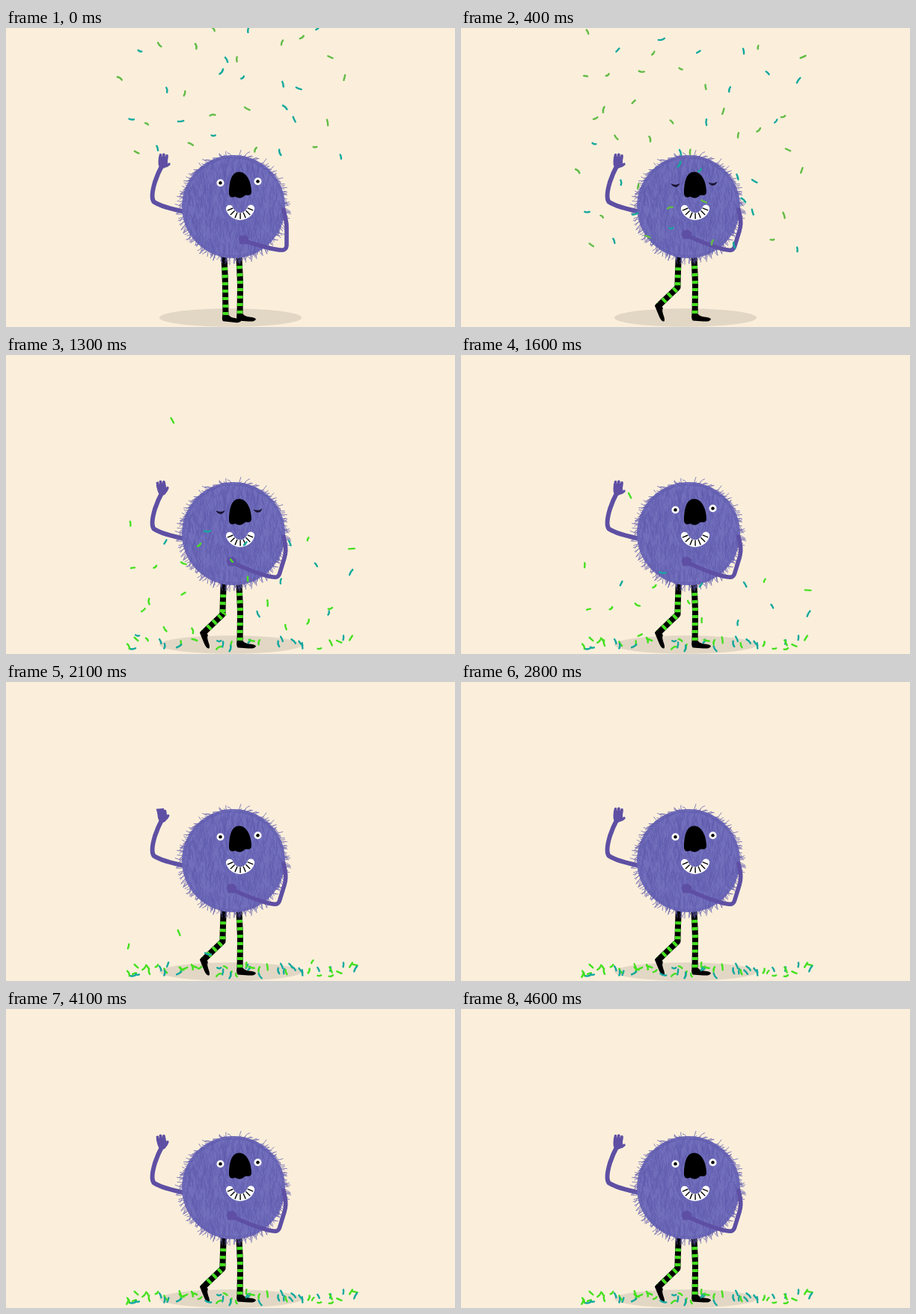
An HTML page with a canvas that plays this animation: 600x400 px, repeating every 4700 ms.

```html
<!DOCTYPE html>
<html lang="en">
<head>
<meta charset="utf-8">
<title>Furry friend with confetti</title>
<style>
  html, body { margin: 0; width: 100%; height: 100%; overflow: hidden; background: #fbefdb; }
  canvas { display: block; }
</style>
</head>
<body>
<canvas id="stage" width="600" height="400"></canvas>
<script>
const STEP = 100, STEPS = 47;
const PAPER = '#fbefdb', SHADE = '#e2d7c5', SKIN = '#5e4fa4', FUR = '#716ebc', HAIR = '#605bad';
const LIME = '#45e01f', LEAF = '#62bb46', TEAL = '#14a89d';

const ctx = document.getElementById('stage').getContext('2d');

function seeded(seed) {
  return () => (seed = (seed * 16807) % 2147483647) / 2147483647;
}
const mix = (a, b, p) => a + (b - a) * p;
const between = (a, b, p) => ({ x: mix(a.x, b.x, p), y: mix(a.y, b.y, p) });

function line(c, path, color, width, cap = 'round') {
  c.strokeStyle = color;
  c.lineWidth = width;
  c.lineCap = cap;
  c.lineJoin = 'round';
  c.stroke(typeof path === 'string' ? new Path2D(path) : path);
}
function fill(c, d, color) {
  c.fillStyle = color;
  c.fill(new Path2D(d));
}
function oval(c, x, y, rx, ry, color) {
  c.fillStyle = color;
  c.beginPath();
  c.ellipse(x, y, rx, ry, 0, 0, 7);
  c.fill();
}
function placed(x, y, angle, paint) {
  ctx.save();
  ctx.translate(x, y);
  ctx.rotate(angle);
  paint();
  ctx.restore();
}

// ---- Furry ball, painted once ----
function paintFur() {
  const layer = document.createElement('canvas');
  layer.width = 600;
  layer.height = 400;
  const c = layer.getContext('2d');
  const rnd = seeded(4711);
  const cx = 304, cy = 239, r = 69;
  const strand = (x, y, a, len, bend, width) => {
    const ex = x + Math.cos(a) * len, ey = y + Math.sin(a) * len;
    const mx = (x + ex) / 2 - Math.sin(a) * bend, my = (y + ey) / 2 + Math.cos(a) * bend;
    line(c, `M${x} ${y}Q${mx} ${my} ${ex} ${ey}`, HAIR, width);
  };
  oval(c, cx, cy, r, r, FUR);
  for (let i = 0; i < 800; i++) {
    const a = rnd() * 6.283, d = Math.sqrt(rnd()) * (r - 4);
    strand(cx + Math.cos(a) * d, cy + Math.sin(a) * d - 4,
      1.57 + (rnd() - 0.5) * 0.8, 7 + rnd() * 7, (rnd() - 0.5) * 5, 0.65);
  }
  for (let i = 0; i < 230; i++) {
    const a = i / 230 * 6.283;
    const side = Math.cos(a) < 0 ? -1 : 1;
    const lean = side * (0.35 + 0.6 * Math.max(0, -Math.sin(a))) + (rnd() - 0.5) * 1.3;
    const d = r - 4;
    strand(cx + Math.cos(a) * d, cy + Math.sin(a) * d, a + lean,
      7 + rnd() * 6, (rnd() - 0.5) * 8, 0.75);
  }
  return layer;
}
const fur = paintFur();

// ---- Legs ----
function leg(hip, knee, heel, bare) {
  const d = `M${hip.x} ${hip.y}Q${knee.x} ${knee.y - 12} ${knee.x} ${knee.y}L${heel.x} ${heel.y}`;
  line(ctx, d, '#000', 8, 'butt');
  const dash = [0, bare];
  for (let i = 0; i < 10; i++) dash.push(4, 6);
  ctx.setLineDash(dash);
  line(ctx, d, LIME, 7.6, 'butt');
  ctx.setLineDash([]);
}
function foot(x, y, angle) {
  placed(x, y, angle, () =>
    fill(ctx, 'M-4.5-5L4.5-5Q6-2.5 12-2Q21-1.500 21 1.2Q19 4.5 11 4L-3 3.6Q-5.5 2-4.5-5Z', '#000'));
}
function legs(p) {
  const knee = between({ x: 293, y: 346 }, { x: 289.5, y: 347 }, p);
  const heel = between({ x: 293.5, y: 388 }, { x: 263.5, y: 372 }, p);
  leg({ x: 291, y: 300 }, knee, heel, 20);
  foot(heel.x, heel.y + 1, mix(0.08, 1.15, p));
  leg({ x: 311, y: 300 }, { x: 313, y: 346 }, { x: 312.5, y: 388 }, 18);
  foot(313, 388, 0.04);
}

// ---- Arms ----
function wavingArm(k) {
  line(ctx, 'M240 246Q209 240 197.5 232.5Q193 226 199 206Q203 194 208.5 184', SKIN, 6);
  const away = k % 2 === 1, flat = k % 6 === 3;
  placed(209, 184, flat ? -0.16 : away ? -0.3 : 0, () => {
    fill(ctx, 'M-5-12L7-12L7-3Q5 4 0 4Q-6 3-5.500-5Z', SKIN);
    if (flat) fill(ctx, 'M-6-15.500L4-14.500L6-9L-5-6Z', SKIN);
    else line(ctx, 'M-3-8L-2.500-14M1.4-8L1.8-14.500M5.4-8L6-13', SKIN, 3.8);
    line(ctx, away ? 'M2 1Q6 0 8.500-4' : 'M2 1Q6 1 9-2', SKIN, 3.4);
  });
}
function heldArm(p) {
  const elbow = between({ x: 375, y: 297.5 }, { x: 364, y: 297.5 }, p);
  const hand = between({ x: 317, y: 283 }, { x: 301, y: 276 }, p);
  const arm = new Path2D();
  arm.moveTo(371, 243);
  arm.arcTo(375, 262, elbow.x, elbow.y, 40);
  arm.arcTo(elbow.x, elbow.y, elbow.x - 30, elbow.y - 2, 6);
  arm.quadraticCurveTo(elbow.x - 20, elbow.y - 1, hand.x + 2, hand.y + 2);
  line(ctx, arm, SKIN, 5.6);
  placed(hand.x, hand.y, 0, () =>
    fill(ctx, 'M-5-4Q-4-7-1-5Q2-8 4-5L7-3L7 5Q4 7 1 6L-3 6.500Q-6 6-5 3Q-7 0-5-4Z', SKIN));
}

// ---- Face ----
function eye(x, y, shut, tilt) {
  if (shut) {
    placed(x, y, tilt, () => fill(ctx, 'M-6 0.5Q0 4.500 6 0.5Q4 5.500 0 5.500Q-4.500 5-6 0.5Z', '#17122e'));
  } else {
    oval(ctx, x, y, 5, 5, '#fff');
    oval(ctx, x, y, 2.2, 2.2, '#000');
  }
}
function face(shut) {
  eye(286.5, 207.3, shut, 0);
  eye(336.5, 205.2, shut, -0.08);
  fill(ctx, 'M298 222C298 206 301 192.500 312 192.500C322 192.500 328 207 328 219' +
    'Q328 225 321.500 223.500Q318.500 223.500 317.500 225.500Q312 229.500 306.500 225.500Q299 228.500 298 222Z', '#000');

  const mx = 313, my = 237;
  const smile = new Path2D();
  smile.arc(mx, my, 15, 0.3, 2.82);
  line(ctx, smile, '#fff', 9.8);
  for (let i = 0; i < 7; i++) {
    const a = 0.38 + i * 0.395, c = Math.cos(a), s = Math.sin(a);
    line(ctx, `M${mx + c * 10.5} ${my + s * 10.5}L${mx + c * 18.5} ${my + s * 18.5}`, '#000', 1.4, 'butt');
  }
}

// ---- Confetti: a jittered grid of scraps that slow down as they fall ----
const rnd = seeded(90210);

function makeScrap(x, y, speed, release, drift, teal) {
  const floor = 378 + rnd() * 15;
  return {
    x, y, speed, release, drift, teal,
    land: speed - Math.sqrt(speed * speed - 2 * (floor - y)),
    angle: rnd() * Math.PI,
    spin: (rnd() - 0.5) * 0.1,
    half: 2.2 + rnd() * 2,
    bend: (rnd() - 0.5) * 4
  };
}
function makeConfetti() {
  const cols = 8, rows = 7, list = [];
  for (let row = 0; row < rows; row++) {
    for (let col = 0; col < cols; col++) {
      const x = 144 + (col + 0.1 + rnd() * 0.8) * 39.5;
      const y = -124 + (row + 0.1 + rnd() * 0.8) * 43.5;
      list.push(makeScrap(x, y, 33, 0, rnd() * 1.8 - 0.6, rnd() < 0.4));
    }
  }
  list.push(makeScrap(219, -22, 38, 10, 1.1, false));
  return list;
}
const scraps = makeConfetti();

function confetti(k) {
  const green = k < 6 ? LEAF : LIME;
  for (const s of scraps) {
    if (k < s.release) continue;
    const t = Math.min(k - s.release, s.land);
    placed(s.x + s.drift * t, s.y + s.speed * t - t * t / 2, s.angle + s.spin * t, () =>
      line(ctx, `M${-s.half} 0Q0 ${s.bend} ${s.half} 0`, s.teal ? TEAL : green, 2.4));
  }
}

// ---- One picture ----
function isShut(k) {
  const beat = k % 9;
  return k < 27 && beat >= 4 && beat <= 6;
}
function draw(k) {
  const t = Math.min(1, k / 3), settle = t * t * (3 - 2 * t);
  ctx.fillStyle = PAPER;
  ctx.fillRect(0, 0, 600, 400);
  oval(ctx, 300, 387.5, 95, 12.3, SHADE);
  legs(settle);
  wavingArm(k);
  ctx.drawImage(fur, 0, 0);
  face(isShut(k));
  heldArm(settle);
  confetti(k);
}

const start = performance.now();
let shown = -1;
function tick() {
  const k = Math.floor((performance.now() - start) / STEP) % STEPS;
  if (k !== shown) draw(shown = k);
  requestAnimationFrame(tick);
}
tick();
</script>
</body>
</html>
```
